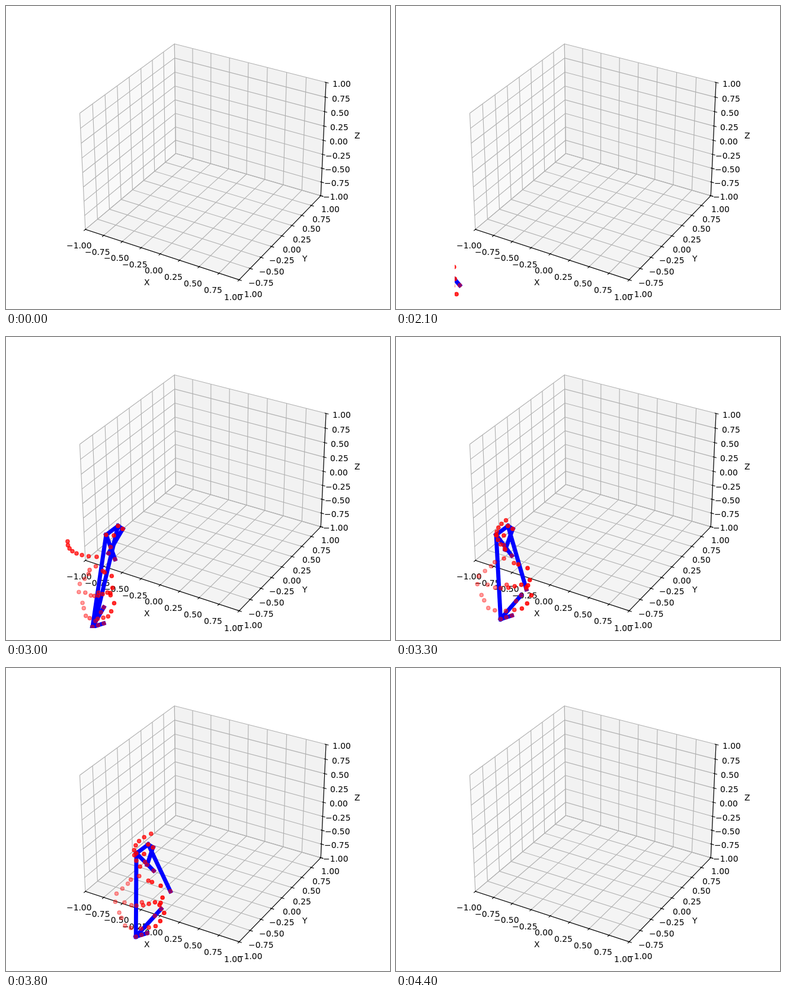
Recreate the animation shown at these times as an HTML page with a canvas. Size 648 px wide and 510 px high, loop 5300 ms.

```html
<!DOCTYPE html>
<html lang="en">
<head>
<meta charset="utf-8">
<title>3D walk plot</title>
<style>
html, body { margin: 0; width: 648px; height: 510px; overflow: hidden; background: #fff; }
canvas { display: block; }
</style>
</head>
<body>
<canvas id="stage" width="648" height="510"></canvas>
<script>
const LOOP = 5300, STEP = 100, START = 2100, END = 4400;
const KEY_START = 2000, KEY_GAP = 500;
const ctx = document.getElementById("stage").getContext("2d");

const add = (p, dx, dy) => [p[0] + dx, p[1] + dy];
const mix = (p, q, k) => [p[0] + (q[0] - p[0]) * k, p[1] + (q[1] - p[1]) * k];

// Four half-strides per joint; the steps before and after follow the gait
const keys = {
  foot: [[75, 387], [189, 318], [189, 318], [274, 283]],
  heel: [[109, 411], [184, 374], [203, 364], [280, 326]],
  hand: [[130, 450], [151, 478], [266, 389], [285, 367]],
  hip: [[88, 505], [146, 488], [197, 466], [234, 443]],
  elbow: [[114, 480], [165, 455], [242, 421], [275, 395]],
  toe: [[101, 347], [104, 344], [240, 285], [248, 275]],
  bend: [[60, 370], [102, 368], [190, 303], [205, 295]]
};
for (const path of Object.values(keys)) {
  path.push(add(path[2], 82, -34));
  path.unshift(add(path[0], -28, 25));
}

// Perspective view: elevation 30, azimuth -60
function project([x, y, z]) {
  x *= .595238; y *= .595238; z *= .446429;
  const depth = 10 - (.433013 * x - .75 * y + .5 * z), scale = 462 / .185;
  return [
    336.24 + scale * (.866025 * x + .5 * y) / depth,
    252.76 - scale * (-.25 * x + .433013 * y + .866025 * z) / depth
  ];
}

function path(points) {
  ctx.beginPath();
  points.forEach(p => ctx.lineTo(...p));
}

function line(color, ...points) {
  ctx.strokeStyle = color;
  path(points.map(project));
  ctx.stroke();
}

function pane(color, ...points) {
  ctx.fillStyle = color;
  path(points.map(project));
  ctx.fill();
}

function label(text, x, baseline) {
  ctx.fillText(text, Math.round(x - ctx.measureText(text).width / 2), Math.round(baseline));
}

// place(r) gives the tick's point, pushed out from the box by the factor r
function tick(v, place) {
  line("#000", place(.984, 1), place(1.032, 1));
  const [x, y] = project(place(1.1328, 1.1328));
  label(v.toFixed(2).replace("-", "\u2212"), x, y + 10.6);
}

function drawAxes() {
  ctx.lineWidth = 1.11;
  ctx.lineCap = "butt";
  pane("#f9f9f9", [-1, -1, -1], [-1, 1, -1], [-1, 1, 1], [-1, -1, 1]);
  pane("#f2f2f2", [-1, 1, -1], [1, 1, -1], [1, 1, 1], [-1, 1, 1]);
  pane("#f4f4f4", [-1, -1, -1], [1, -1, -1], [1, 1, -1], [-1, 1, -1]);
  const steps = Array.from({ length: 9 }, (_, i) => i / 4 - 1);
  for (const v of steps) {
    line("#b0b0b0", [v, -1, -1], [v, 1, -1], [v, 1, 1]);
    line("#b0b0b0", [1, v, -1], [-1, v, -1], [-1, v, 1]);
    line("#b0b0b0", [1, 1, v], [-1, 1, v], [-1, -1, v]);
  }
  line("#000", [-1, -1, -1], [1, -1, -1], [1, 1, -1], [1, 1, 1]);

  ctx.fillStyle = "#000";
  ctx.font = '13.89px "DejaVu Sans", sans-serif';
  for (const v of steps) {
    tick(v, (r, s) => [v, -r, -s]);
    tick(v, (r, s) => [r, v, -s]);
    tick(v, (r, s) => [r, s, v]);
  }
  label("X", 237.5, 470);
  label("Y", 504, 430);
  label("Z", 592.5, 223);
}

function dot([x, y], alpha) {
  ctx.globalAlpha = Math.max(.38, Math.min(.85, alpha));
  ctx.beginPath();
  ctx.arc(x, y, 3.1, 0, 2 * Math.PI);
  ctx.fill();
  ctx.stroke();
}

function seeded(seed) {
  return () => (seed = seed * 16807 % 2147483647) / 2147483647;
}

// Marker cloud around the trunk: a ring and a row through its middle
function drawTrunk(hip, spread) {
  const random = seeded(41), jitter = size => (random() - .5) * size;
  const [cx, cy] = add(hip, 7, -56);
  const mark = (x, y) => dot([cx + x + jitter(8), cy + y + jitter(8)], .58 + x / 110);
  for (let i = 0; i < 20; i++) {
    const angle = i / 20 * 2 * Math.PI;
    mark(spread * Math.cos(angle), 44 * Math.sin(angle));
  }
  for (let i = 0; i < 8; i++) mark(spread * (i / 5 - .6), 0);
}

// Markers along the curved free leg
function drawLeg(toe, bend, knee) {
  for (let i = 0; i < 8; i++) {
    const k = i / 7;
    dot(mix(mix(toe, bend, k), mix(bend, knee, k), k), .72);
  }
}

function drawWalker(time) {
  const at = (time - KEY_START) / KEY_GAP, i = Math.floor(at);
  const pose = {};
  for (const name in keys) pose[name] = mix(keys[name][i], keys[name][i + 1], at - i);
  const { foot, heel, hand, hip, elbow, toe, bend } = pose;
  const ankle = add(foot, -20, 15), tip = add(foot, 8, 5);
  const arch = add(heel, -11, -10), side = add(hip, 19, -6);
  const spread = 27 + 20 * Math.max(0, Math.sin((at - 2) / 2 * Math.PI));

  ctx.save();
  ctx.beginPath();
  ctx.rect(99, 28, 462, 462);
  ctx.clip();

  ctx.strokeStyle = "#00f";
  ctx.lineWidth = 6.94;
  ctx.lineCap = "square";
  const bones = [
    [ankle, foot], [foot, tip], [ankle, hip], [hip, elbow],
    [hip, side], [ankle, heel], [tip, arch], [foot, hand]
  ];
  for (const bone of bones) {
    path(bone);
    ctx.stroke();
  }

  ctx.fillStyle = ctx.strokeStyle = "#f00";
  ctx.lineWidth = 1.39;
  drawLeg(toe, bend, add(hip, 7, -118));
  drawTrunk(hip, spread);
  for (const p of [ankle, foot, tip, add(ankle, 13, 1)]) dot(p, .8);
  for (const p of [heel, arch, hand, hip, elbow, side]) dot(p, .5);
  dot(mix(hip, elbow, .75), .5);
  dot(mix(hip, side, .5), .5);
  dot(mix(ankle, heel, .5), .6);
  ctx.restore();
}

function frame(now) {
  const time = Math.floor(now % LOOP / STEP) * STEP;
  ctx.fillStyle = "#fff";
  ctx.fillRect(0, 0, 648, 510);
  drawAxes();
  if (time >= START && time < END) drawWalker(time);
  requestAnimationFrame(frame);
}
frame(0);
</script>
</body>
</html>
```
